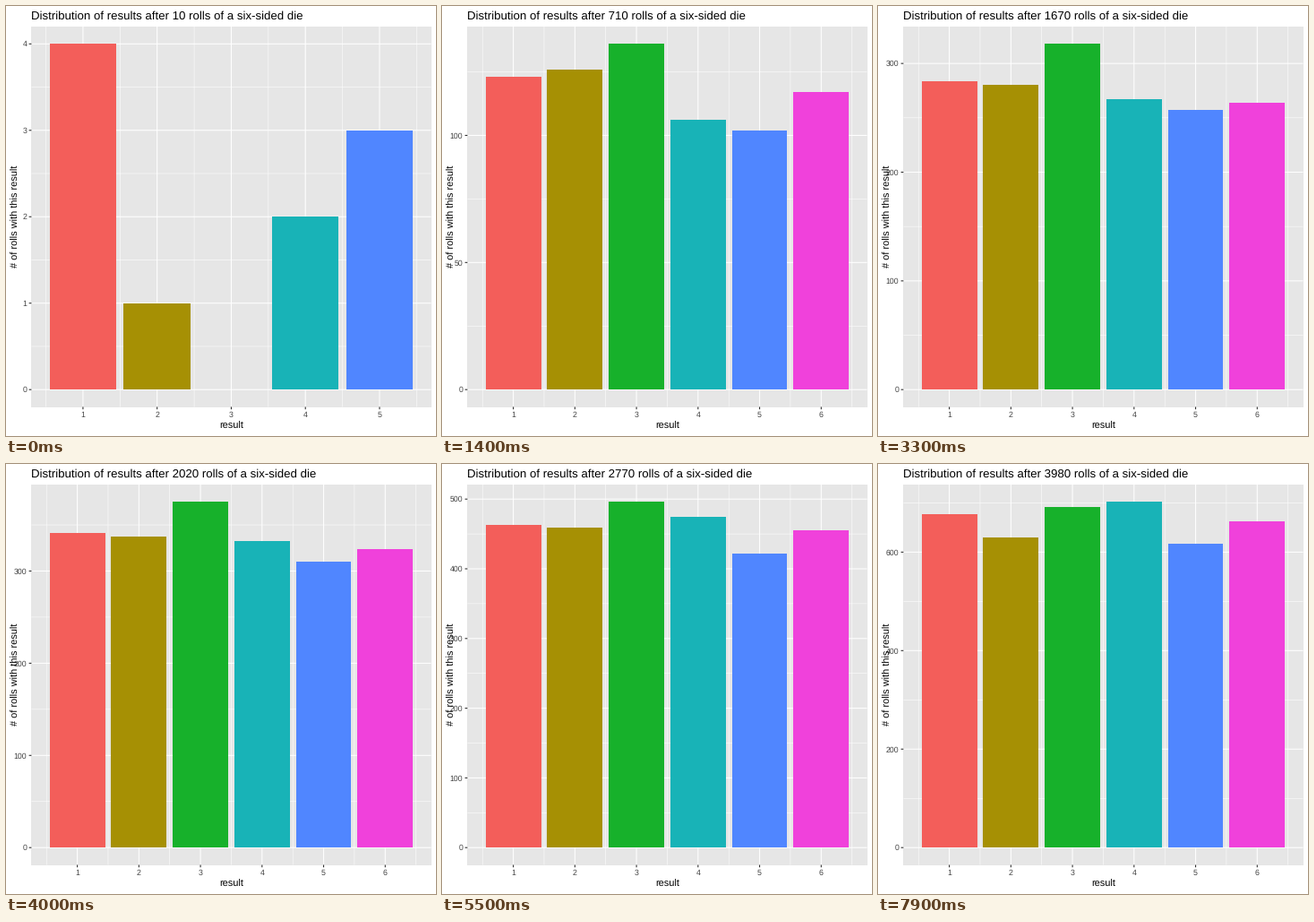
A matplotlib script that plays this animation: 480x480 px, repeating every 8000 ms.

```python
import matplotlib.pyplot as plt
import numpy as np
from matplotlib.animation import FuncAnimation
from matplotlib.collections import LineCollection
from matplotlib.patches import Rectangle

SIZE, DPI = 480, 80
FRAMES, INTERVAL = 80, 100
PX = 72 / DPI  # points per pixel

LEFT, RIGHT, TOP, BOTTOM = 28.4, 474.5, 23.0, 447.5
COLORS = ["#F35E5A", "#A69004", "#17B12B", "#18B3B7", "#5086FF", "#F041DB"]
PANEL, TICK, LABEL = "#E6E6E6", "#2B2B2B", "#424242"

plt.rcParams["font.family"] = "Liberation Sans"
plt.rcParams["text.hinting"] = "none"

# Key points: step -> tallies of faces 1 to 5; face 6 takes the rest.
KEYS = {
    0: (4, 1, 0, 2, 3),
    14: (123, 126, 136, 106, 102),
    26: (227, 223, 262, 201, 205),
    55: (463, 459, 496, 475, 422),
    69: (578, 560, 604, 624, 526),
    79: (677, 630, 692, 702, 617),
}


def tally(step):
    """Number of rolls so far and how often each face came up."""
    total = 10 * round(1 + 5.02 * step)
    counts = [round(np.interp(step, list(KEYS), face)) for face in zip(*KEYS.values())]
    return total, np.array(counts + [total - sum(counts)])


def nice_breaks(top):
    """Extended Wilkinson axis breaks starting at zero."""
    lo, hi = -0.05 * top, 1.05 * top
    span = hi - lo

    def score(rank, step, count):
        last = step * (count - 1)
        simple = 1 - rank / 5
        cover = 1 - 0.5 * ((hi - last) ** 2 + lo ** 2) / (0.1 * span) ** 2
        ratio = (max(last, hi) - lo) / (4 * step)
        dense = 2 - max(ratio, 1 / ratio)
        return 0.25 * simple + 0.2 * cover + 0.5 * dense

    options = [(rank, q * 10.0 ** power, count)
               for rank, q in enumerate([1, 5, 2, 2.5, 4, 3])
               for power in range(-1, 4)
               for count in range(2, 13)]
    _, step, count = max(options, key=lambda o: score(*o))
    return step, step * np.arange(count)


fig = plt.figure(figsize=(SIZE / DPI, SIZE / DPI), dpi=DPI, facecolor="white")
ax = fig.add_axes([0, 0, 1, 1])


def box(x0, y0, x1, y1, color, z):
    ax.add_patch(Rectangle((x0, y0), x1 - x0, y1 - y0, facecolor=color,
                           linewidth=0, snap=True, antialiased=False, zorder=z))


def lines(segments, color, width, z):
    ax.add_collection(LineCollection(segments, colors=color, linewidths=width * PX,
                                     capstyle="butt", snap=False, zorder=z),
                      autolim=False)


def text(x, y, s, size, color="black", **kw):
    ax.text(x, y, s, fontsize=size * PX, color=color, va="baseline", zorder=6, **kw)


def grid(xs, ys, width, z):
    lines([[(x, TOP), (x, BOTTOM)] for x in xs]
          + [[(LEFT, y), (RIGHT, y)] for y in ys], "white", width, z)


def draw(step):
    ax.clear()
    ax.set(xlim=(0, SIZE), ylim=(SIZE, 0))
    ax.axis("off")

    total, counts = tally(step)
    faces = np.flatnonzero(counts) + 1
    top, last = counts.max(), faces.max()

    x_span = last - 0.1
    x_unit = (RIGHT - LEFT) / (1.1 * x_span)
    y_unit = (BOTTOM - TOP) / (1.1 * top)

    def px(v):
        return LEFT + (v - 0.55 + 0.05 * x_span) * x_unit

    def py(v):
        return BOTTOM - (v + 0.05 * top) * y_unit

    gap, breaks = nice_breaks(top)
    limit = 1.05 * top
    major = [b for b in breaks if b <= limit]
    minor = [b + gap / 2 for b in breaks if b + gap / 2 <= limit]
    ticks = range(1, last + 1)

    box(LEFT, TOP, RIGHT, BOTTOM, PANEL, 1)
    grid([px(k + 0.5) for k in range(last + 1)], [py(b) for b in minor], 0.53, 2)
    grid([px(k) for k in ticks], [py(b) for b in major], 1.07, 3)
    for face in faces:
        box(px(face - 0.45), py(counts[face - 1]), px(face + 0.45), py(0),
            COLORS[face - 1], 4)

    lines([[(px(k), BOTTOM), (px(k), BOTTOM + 2.75)] for k in ticks]
          + [[(LEFT - 2.75, py(b)), (LEFT, py(b))] for b in major], TICK, 1.07, 5)
    digits = 0 if gap == int(gap) else 1
    for b in major:
        text(LEFT - 4.95, py(b) + 3.15, f"{b:.{digits}f}", 8.8, LABEL, ha="right")
    for k in ticks:
        text(px(k), 458.8, str(k), 8.8, LABEL, ha="center")

    text((LEFT + RIGHT) / 2, 472, "result", 11, ha="center")
    text(13.4, (TOP + BOTTOM) / 2, "# of rolls with this result", 11,
         ha="center", rotation=90, rotation_mode="anchor")
    text(LEFT, 15, f"Distribution of results after {total} rolls of a six-sided die",
         13.2, ha="left")
    return []


anim = FuncAnimation(fig, draw, frames=FRAMES, interval=INTERVAL,
                     init_func=lambda: [], repeat=True, repeat_delay=0)
plt.show()
```
